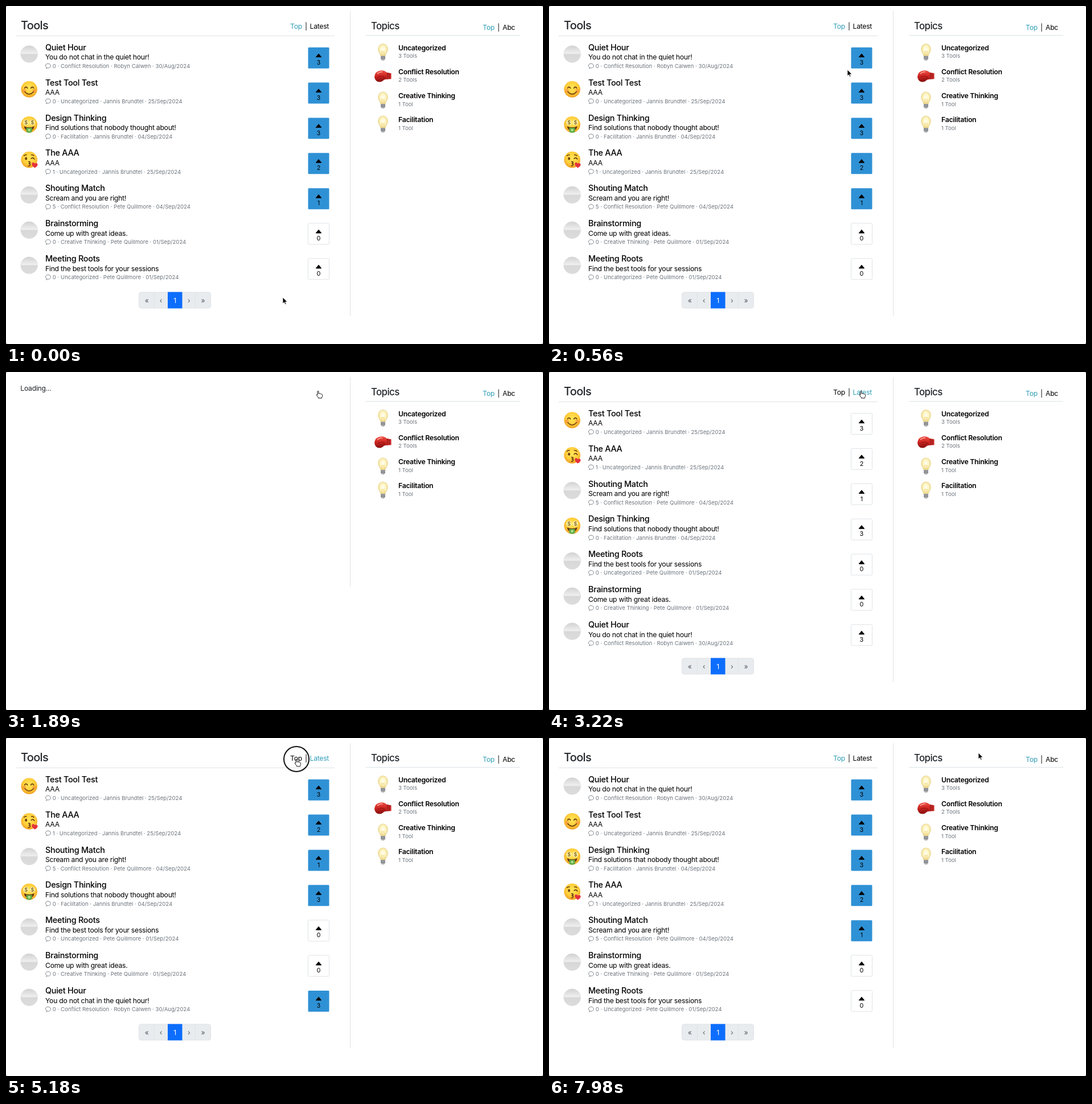
An HTML page that plays this animation: 943x594 px, repeating every 8000 ms.

```html
<!DOCTYPE html>
<html lang="en">
<head>
<meta charset="utf-8">
<title>Tool list</title>
<style>
html, body { margin: 0; width: 100%; height: 100%; overflow: hidden; background: #777; }
svg { display: block; }
text { font: 400 12.2px Inter, "Open Sans", sans-serif; letter-spacing: -.021em; white-space: pre; }
.head { font-weight: 500; font-size: 20px; letter-spacing: -.035em; fill: #212529; }
.sub { font-size: 16.8px; }
.title { font-weight: 500; font-size: 14.4px; letter-spacing: -.018em; }
.meta { font-size: 9.6px; letter-spacing: 0; fill: #6c757d; }
.topic { font-weight: 600; }
.mid { text-anchor: middle; letter-spacing: 0; }
.votes { font-size: 11px; }
.link { fill: #319fb8; }
.rule { stroke: #dee2e6; fill: none; }
.ink { stroke: #6b3a0c; stroke-width: 1.7; stroke-linecap: round; fill: none; }
</style>
</head>
<body>
<svg width="943" height="594" viewBox="0 0 943 594">
  <defs>
    <linearGradient id="grey" x2="0" y2="1">
      <stop stop-color="#d2d2d2"/><stop offset=".46" stop-color="#efefef"/>
      <stop offset=".52" stop-color="#d8d8d8"/><stop offset="1" stop-color="#dcdcdc"/>
    </linearGradient>
    <radialGradient id="gold" cy=".4" r=".6">
      <stop stop-color="#ffe658"/><stop offset=".6" stop-color="#ffcf3c"/><stop offset="1" stop-color="#f0a024"/>
    </radialGradient>
    <radialGradient id="glow" cy=".45">
      <stop stop-color="#fffef2"/><stop offset=".6" stop-color="#fff5c4"/><stop offset="1" stop-color="#eed98c"/>
    </radialGradient>
    <linearGradient id="red" x2="0" y2="1">
      <stop stop-color="#ee5348"/><stop offset=".5" stop-color="#cc2420"/><stop offset="1" stop-color="#851010"/>
    </linearGradient>
    <g id="blank"><circle r="14.8" fill="url(#grey)" stroke="#d3d3d3" stroke-width=".6"/></g>
    <g id="face"><circle r="14.3" fill="url(#gold)"/></g>
    <g id="smile">
      <use href="#face"/>
      <g fill="#f58a3c" opacity=".6"><circle cx="-9" cy="2.5" r="3.2"/><circle cx="9" cy="2.5" r="3.2"/></g>
      <path class="ink" d="M-8-2q2.5-4 5 0M3-2q2.5-4 5 0M-7.5 4.5q7.5 8 15 0"/>
    </g>
    <g id="money">
      <use href="#face"/>
      <path d="M-9 3q9 4 18 0-1 8-9 8t-9-8z" fill="#6b3410"/>
      <path d="M-5 5.3q5 1.2 10 0V13q-5 3-10 0z" fill="#5fae46"/>
      <circle cy="9.7" r="2.2" fill="#b8df91"/>
      <g fill="#fff1a8"><circle cx="-5.6" cy="-3.5" r="4.8"/><circle cx="5.6" cy="-3.5" r="4.8"/></g>
      <g class="mid" fill="#80631b"><text x="-5.6" y="0" style="font-size:9px;font-weight:600">$</text><text x="5.6" y="0" style="font-size:9px;font-weight:600">$</text></g>
    </g>
    <g id="kiss">
      <use href="#face"/>
      <path class="ink" d="M-9-7q2-2 4-1.5M4-8.5q2.5-.5 4 1.5M3.5-2q3-3 5.5 1M-1 3.5q4 0 2 2.5-1 .8-2 .8 4 0 2.4 2.8-1 1.4-2.8 1.3"/>
      <ellipse cx="-5.5" cy="-2" rx="1.9" ry="2.6" fill="#6b3a0c"/>
      <path d="M9.5 14.5Q3 9 5 5.7 7.5 3.4 10 6.8q3.4-2 4.8.8 1 3.6-5.3 6.9z" fill="#e3333c"/>
    </g>
    <g id="bulb">
      <path d="M-4 7Q-4.500 4-7 .5C-10.500-6-7-14.500 0-14.500S10.500-6 7 .5Q4.500 4 4 7z" fill="url(#glow)" stroke="#e3cf8c" stroke-width=".6"/>
      <path d="M-1.500 6-2-2 0 0 2-2 1.500 6" fill="none" stroke="#e7c96c" stroke-width=".7"/>
      <path d="M-4 6.500H4V12L2 14.700H-2L-4 12z" fill="#a9abae"/>
      <path d="M-4 8.500H4M-4 11H4" stroke="#707377"/>
    </g>
    <g id="glove">
      <path d="M-15 1Q-14-9-3-10 3-10.500 7-6L7 5.500Q2 5 0 8-4 11.500-10 9.500-14.500 7-15 1z" fill="url(#red)"/>
      <path d="M6.500-6.500 14.500-5V5L6.500 5.500Q5 0 6.500-6.500z" fill="#c92a26"/>
      <path d="M8-6V5.500M11-5.200V5" stroke="#8d1717"/>
      <path d="M-9 2Q-2-2 3 2 0 5-6 5" fill="none" stroke="#8d1313"/>
      <path d="M-10-4Q-6-8-1-7.500" fill="none" stroke="#ffa39a" stroke-width="1.500"/>
    </g>
    <path id="bubble" d="M70.600 110q.8-.8.7-2.200Q69.500 106.500 69.500 105C69.500 100 78.300 100 78.300 105 78.300 108.600 75 109.300 72.800 108.700q-1 1-2.200 1.300z" fill="none" stroke="#6c757d" stroke-width=".9"/>
  </defs>
  <rect width="943" height="594" rx="3" fill="#fff"/>
  <g id="page"></g>
  <g id="topics"></g>
  <g id="pointer">
    <circle id="ring" r="22" fill="none" stroke="#111" stroke-width="2"/>
    <path id="arrow" d="M0 0V11L2.600 8.700 4.300 12.500 6 11.800 4.400 8H8Z" stroke="#fff" stroke-width=".8"/>
    <path id="hand" fill="#fff" stroke="#111" stroke-linejoin="round" d="M-1 6V1.500Q-1 .3 0 .3T1 1.500V5L2.500 4.700 3.500 5.200H4.800L5.700 5.900 6.700 6Q7.600 6.400 7.500 7.600V9.600Q7.300 10.800 6.600 11.600V12.900H.5V11.900Q-1 10.300-2.500 7.700-3 6.500-2 6.400-1.400 6.400-1 7.200z"/>
  </g>
</svg>
<script>
const $ = id => document.getElementById(id);
const LOOP = 8000, STEP = 70, PITCH = 61.87;

// icon, title, description, comments, details, votes
const tools = [
  ['blank', 'Quiet Hour', 'You do not chat in the quiet hour!', 0, 'Conflict Resolution · Robyn Calwen · 30/Aug/2024', 3],
  ['smile', 'Test Tool Test', 'AAA', 0, 'Uncategorized · Jannis Brundtel · 25/Sep/2024', 3],
  ['money', 'Design Thinking', 'Find solutions that nobody thought about!', 0, 'Facilitation · Jannis Brundtel · 04/Sep/2024', 3],
  ['kiss', 'The AAA', 'AAA', 1, 'Uncategorized · Jannis Brundtel · 25/Sep/2024', 2],
  ['blank', 'Shouting Match', 'Scream and you are right!', 5, 'Conflict Resolution · Pete Quillmore · 04/Sep/2024', 1],
  ['blank', 'Brainstorming', 'Come up with great ideas.', 0, 'Creative Thinking · Pete Quillmore · 01/Sep/2024', 0],
  ['blank', 'Meeting Roots', 'Find the best tools for your sessions', 0, 'Uncategorized · Pete Quillmore · 01/Sep/2024', 0]
];
const topics = [
  ['bulb', 'Uncategorized', '3 Tools'], ['glove', 'Conflict Resolution', '2 Tools'],
  ['bulb', 'Creative Thinking', '1 Tool'], ['bulb', 'Facilitation', '1 Tool']
];
const byTop = [0, 1, 2, 3, 4, 5, 6], byLatest = [1, 3, 4, 2, 6, 5, 0];
const never = Infinity;

// from: start time; order: row order (none while loading); votedAt: time each button turns blue
const views = [
  { from: 0, order: byTop, votedAt: [0, 0, 0, 0, 0, never, never] },
  { from: 1820 },
  { from: 3220, order: byLatest, votedAt: [3290, 3360, 3430, 3570, never, never, 3780] },
  { from: 5320 },
  { from: 6580, order: byTop, votedAt: [6650, 6650, 6720, 6860, 6930, never, never] }
];
const clicks = [1610, 5110];
const path = [
  [0, 486, 512], [560, 524, 112], [840, 536, 100], [1260, 548, 33], [4270, 548, 33],
  [4830, 510, 37], [7420, 510, 37], [7980, 754, 26], [LOOP, 754, 26]
];

const text = (x, y, str, cls = '') => `<text x="${x}" y="${y}" class="${cls}">${str}</text>`;
const icon = (name, x, y) => `<use href="#${name}" x="${x}" y="${y}"/>`;
const rule = d => `<path class="rule" d="${d}"/>`;

function row([pic, title, desc, comments, details, votes], i, voted) {
  const button = voted
    ? '<rect x="530.5" y="72.700" width="37" height="37" rx="1.500" fill="#2f91d5"/>'
    : '<rect x="530.5" y="72.500" width="37" height="37" rx="2" class="rule"/>';
  return `<g transform="translate(0 ${i * PITCH})">` + icon(pic, 40.7, 84.5) +
    text(69, 77.8, title, 'title') + text(69, 94.3, desc) + '<use href="#bubble"/>' +
    text(81.8, 109, `${comments} · ${details}`, 'meta') + button +
    '<path d="M544.300 89.700 549 84 553.700 89.700z" stroke="#000" stroke-linejoin="round"/>' +
    text(549, 102.8, votes, 'mid votes') + '</g>';
}

const pager = '<rect x="233.5" y="503" width="126" height="28" rx="4" fill="#e9ecef" stroke="#dee2e6"/>' +
  rule('M260.500 503V531M332.500 503V531') +
  '<rect x="284" y="502.600" width="25.500" height="28.800" fill="#0d6efd"/>' +
  [...'«‹1›»'].map((c, i) =>
    `<g fill="${c === '1' ? '#fff' : '#555c63'}">${text(247.3 + i * 24.7, 521.5, c, 'mid')}</g>`).join('');

function page({ order, votedAt }, t) {
  if (!order) return `<g fill="#212529">${text(25.3, 33.3, 'Loading...')}</g>` + rule('M604.500 9V377');
  const latest = order === byLatest;
  return text(26, 40.5, 'Tools', 'head') +
    text(499, 40.2, 'Top', latest ? '' : 'link') + text(525, 40, '|') +
    text(533.5, 40.2, 'Latest', latest ? 'link' : '') +
    rule('M17 52.500H577M604.500 9V545') +
    order.map((n, i) => row(tools[n], i, t >= votedAt[i])).join('') + pager;
}

$('topics').innerHTML = text(641, 41, 'Topics', 'head sub') + text(837, 42.3, 'Top', 'link') +
  text(863, 42, '|') + text(872, 42.3, 'Abc') + rule('M632 51.500H903') +
  topics.map(([pic, name, count], i) => {
    const y = i * 42.2;
    return icon(pic, 662, 81 + y) + text(689, 77.8 + y, name, 'topic') + text(689, 91.2 + y, count, 'meta');
  }).join('');

function pointerAt(t) {
  const i = path.findIndex(p => p[0] > t);
  const [t0, x0, y0] = path[i - 1], [t1, x1, y1] = path[i];
  const k = (t - t0) / (t1 - t0), e = k * k * (3 - 2 * k);
  return [x0 + (x1 - x0) * e, y0 + (y1 - y0) * e];
}

function overLink(x, y) {
  if (y > 28 && y < 45) return x > 498 && x < 520 || x > 533 && x < 569;
  const dy = (y - 72.5) % PITCH;
  return x > 530 && x < 568 && dy >= 0 && dy < 38;
}

let shown = '';
function draw(now) {
  const t = Math.floor(now % LOOP / STEP) * STEP;
  const html = page(views.findLast(v => t >= v.from), t);
  if (html !== shown) $('page').innerHTML = shown = html;

  const [x, y] = pointerAt(t), hand = overLink(x, y);
  $('pointer').setAttribute('transform', `translate(${x} ${y})`);
  $('hand').style.display = hand ? '' : 'none';
  $('arrow').style.display = hand ? 'none' : '';
  $('ring').style.display = clicks.some(c => t >= c && t < c + 140) ? '' : 'none';
}

const start = performance.now();
(function tick() {
  draw(performance.now() - start);
  requestAnimationFrame(tick);
})();
</script>
</body>
</html>
```
